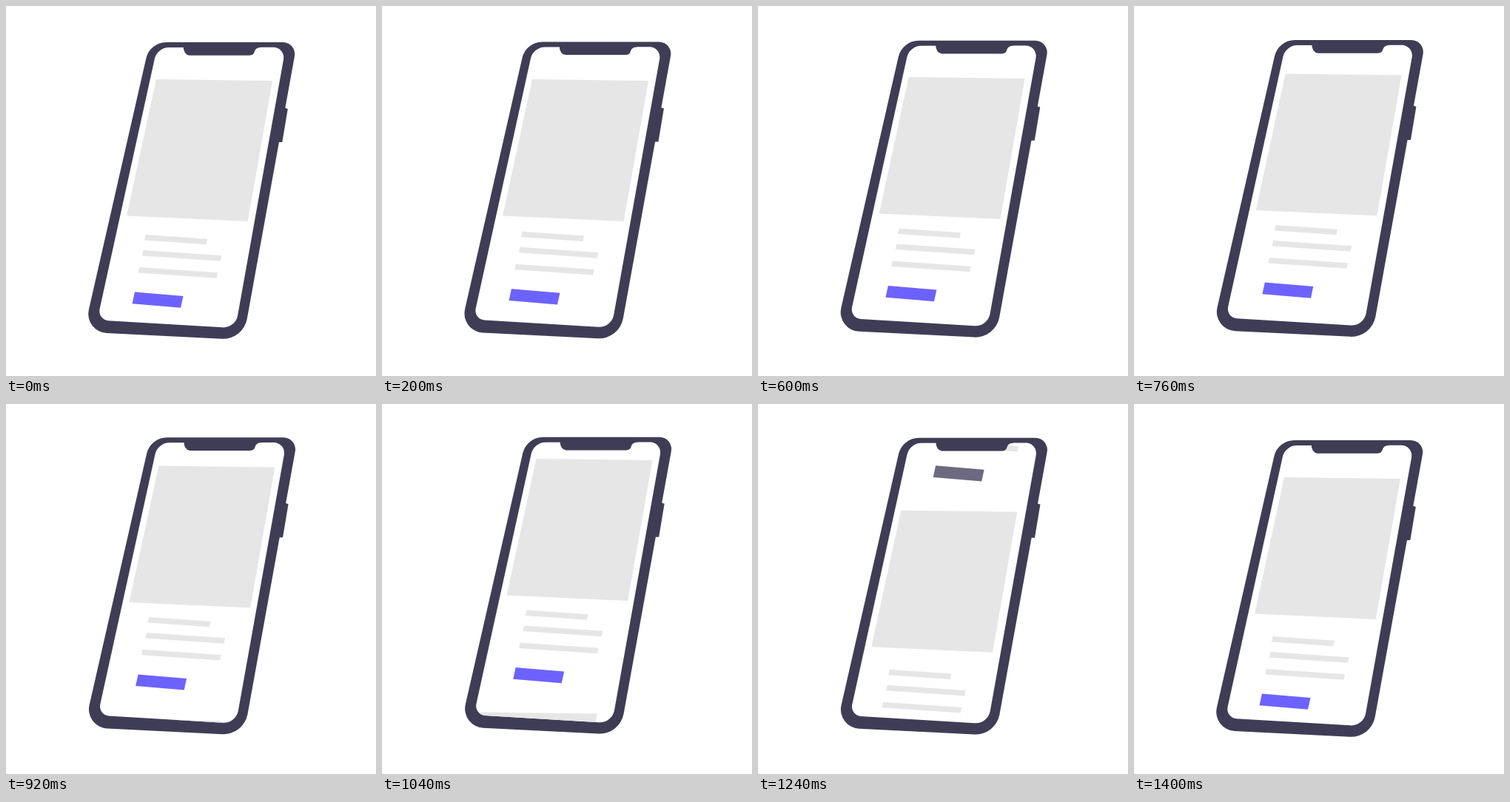
Write an HTML page that moves like this. It is 500 px wide and 500 px high and loops after 1.44 s.

```html
<!DOCTYPE html>
<html lang="en">
<head>
<meta charset="utf-8">
<title>Phone scroll</title>
<style>
  html, body { margin: 0; width: 100%; height: 100%; overflow: hidden; background: #fff; }
  svg { display: block; width: 100vw; height: 100vh; }
</style>
</head>
<body>
<svg viewBox="0 0 500 500">
  <defs><clipPath id="clip"></clipPath></defs>
  <g id="phone">
    <g id="body"></g>
    <g clip-path="url(#clip)"><g id="scroll"></g></g>
    <path id="notch" d="M239.5 54H344V56Q338 56 336 61Q335 66.7 329 66.7H248Q240 66 239.5 54Z"/>
  </g>
</svg>
<script>
const LOOP = 1440, STEP = 40;
const PEAK = 1160, FLICK = 1040, END = 1400;
const PITCH = 342.5;  // distance from one card to the next
const DRAG = 25;      // slow travel before the flick
const SLANT = 0.218;  // sideways shift per unit of height
const LAG = 10.5;     // how far the details trail a new card
const DARK = '#3f3d56', PURPLE = '#6c63ff', GREY = '#e6e6e6', DIM = '#6c6980';

const $ = id => document.getElementById(id);
const phone = $('phone'), body = $('body'), scroll = $('scroll');

function add(parent, name, attrs = {}) {
  const el = document.createElementNS('http://www.w3.org/2000/svg', name);
  for (const key in attrs) el.setAttribute(key, attrs[key]);
  return parent.appendChild(el);
}

// Clockwise polygon of [x, y, radius] corners, joined by circular arcs.
function rounded(corners) {
  const n = corners.length;
  return corners.map(([x, y, r], i) => {
    const [ax, ay] = corners[(i + n - 1) % n], [bx, by] = corners[(i + 1) % n];
    const a = Math.atan2(ay - y, ax - x), b = Math.atan2(by - y, bx - x);
    const angle = Math.acos(Math.cos(a - b)), d = r / Math.tan(angle / 2);
    const at = dir => `${x + d * Math.cos(dir)} ${y + d * Math.sin(dir)}`;
    return `${i ? 'L' : 'M'}${at(a)}A${r} ${r} 0 0 1 ${at(b)}`;
  }).join('') + 'Z';
}

const shell = rounded([[194.3, 49, 28], [393.4, 49, 16], [320.6, 451.2, 33], [105, 440.5, 26]]);
const glass = rounded([[204.2, 56, 20], [378, 55.7, 14], [310, 435.4, 20], [123.3, 424.3, 13]]);

add(body, 'path', { d: shell, fill: DARK });
add(body, 'polygon', { points: '375,137 380.8,139 373.3,184 367,184', fill: DARK });
add(body, 'path', { d: glass, fill: '#fff' });
add($('clip'), 'path', { d: glass });
$('notch').setAttribute('fill', DARK);

function bar(parent, x, y, w, h, fill = GREY, tilt = 0.069) {
  const run = `l${w} ${w * tilt}l${-SLANT * h} ${h}l${-w} ${-w * tilt}z`;
  return add(parent, 'path', { d: `M${x} ${y}${run}`, fill });
}

function makeCard() {
  const root = add(scroll, 'g');
  add(root, 'polygon', { points: '203,99 360,101 326.7,291 163,283.5', fill: GREY });
  const details = add(root, 'g');
  bar(details, 189.8, 303.5, 83.5, 7.5);
  bar(details, 186.7, 324.5, 106, 7.5);
  bar(details, 181.2, 347.4, 106, 7.5);
  const button = bar(details, 175.2, 381, 65.5, 15.7, PURPLE, 0.084);
  return { root, details, button };
}

const place = (el, x, y) => el.setAttribute('transform', `translate(${x.toFixed(3)} ${y.toFixed(3)})`);
const rise = (el, y) => place(el, SLANT * y, -y);

// A slow drag that gathers pace, then a flick that eases out.
function travel(t) {
  if (t < FLICK) return DRAG * (t / FLICK) ** 3.84;
  const u = Math.min(1, (t - FLICK) / (END - FLICK));
  return DRAG + (PITCH - DRAG) * (1 - (1 - u ** 1.378) ** 3.33);
}

const first = makeCard(), second = makeCard();

function draw(t) {
  const lift = t < PEAK ? (t / PEAK) ** 1.2 : Math.max(0, (END - t) / (END - PEAK));
  const dx = lift, dy = -4.8 * lift;
  place(phone, dx, dy);
  place(scroll, -dx, -dy);

  const y = travel(t);
  rise(first.root, y);
  rise(second.root, y - PITCH);
  rise(first.details, -5.5 * Math.max(0, 1 - t / 400) ** 2);
  rise(second.details, -LAG);
  first.button.setAttribute('fill', t >= 1200 ? DIM : PURPLE);
}

function frame() {
  const t = performance.now() % LOOP;
  draw(Math.floor(t / STEP) * STEP);
  requestAnimationFrame(frame);
}
frame();
</script>
</body>
</html>
```
